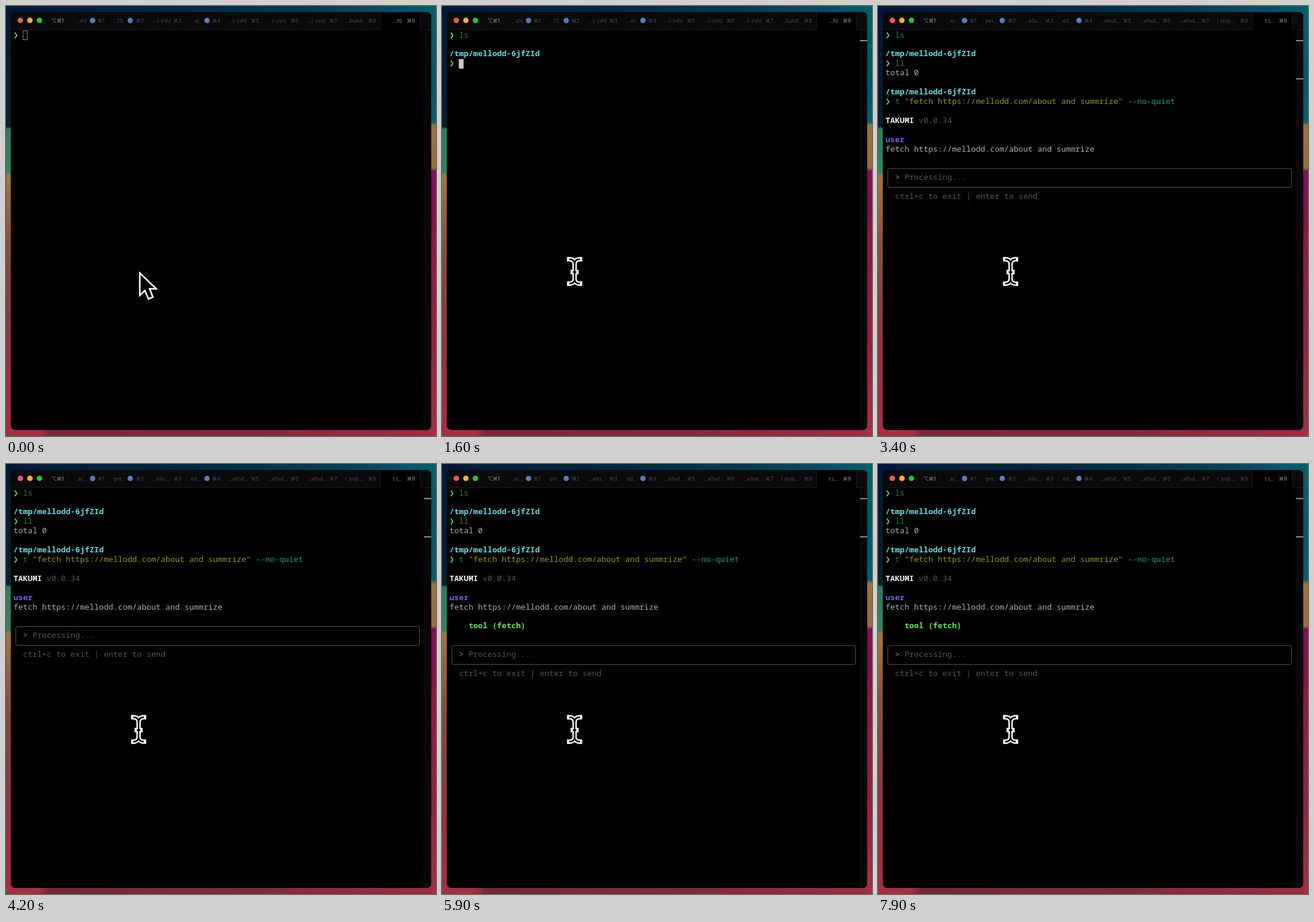
Animation of 720x720 px, one loop 8 s. Source, as an HTML page:

```html
<!DOCTYPE html>
<html lang="en">
<head>
<meta charset="utf-8">
<title>Terminal session</title>
<style>
  html, body { margin: 0; width: 100%; height: 100%; overflow: hidden; background: #000; }
  /* wallpaper showing around the window: left, right, top, bottom */
  body {
    background:
      linear-gradient(#021a3a, #06202c 202px, #2c7c5c 206px, #30845c 278px, #a47440 284px,
        #885038 400px, #84403c 500px, #98303c 600px, #a82e40) 0 0 / 8px 720px no-repeat,
      linear-gradient(#006068, #005868 130px, #006070 194px, #a07434 200px, #986c34 272px, #880c58 276px,
        #841048 345px, #901840 400px, #981e40 560px, #a83040) 712px 0 / 8px 720px no-repeat,
      linear-gradient(90deg, #021a3a, #04283e 300px, #06384c 500px, #0c4860 620px, #065468 670px, #006068)
        0 0 / 720px 20px no-repeat,
      linear-gradient(90deg, #a83040 56px, #782838 72px, #802a3a 400px, #a42c40) 0 700px / 720px 20px no-repeat;
  }
  svg { display: block; width: 720px; height: 720px; }
  text { white-space: pre; }
  #screen text { font: 13.25px "Noto Sans Mono", "DejaVu Sans Mono", monospace; }
  #tabs text { font: 8.5px Inter, "DejaVu Sans", sans-serif; fill: #4c4a4c; }
  #tabs .on { fill: #969498; }
  #screen .prompt { fill: #64ec50; font-weight: 700; }
  #screen .path { fill: #64dce0; font-weight: 600; }
  #screen .cmd { fill: #28862c; }
  #screen .str { fill: #98942c; }
  #screen .opt { fill: #229c80; }
  #screen .out { fill: #b0aeb0; }
  #screen .dim { fill: #585658; }
  #screen .mark { fill: #908e90; }
  #screen .title { fill: #f2f0f2; font-weight: 700; }
  #screen .user { fill: #7064e8; font-weight: 600; }
  #screen .tool { fill: #64e860; font-weight: 600; }
</style>
</head>
<body>
<svg viewBox="0 0 720 720">
  <rect x="8" y="10" width="704" height="700" rx="8"/>
  <path d="M8 40V18a8 8 0 0 1 8-8H704a8 8 0 0 1 8 8V40Z" fill="#0a0a0c"/>
  <path d="M699 40h13V702a8 8 0 0 1-8 8h-5Z" fill="#09090b"/>
  <path d="M628 11h65v29h-65Z"/>
  <path d="M8 39.5H628M693.5 12V39.5H712M627.5 12V39" fill="none" stroke="#1a1a1c"/>
  <circle cx="24" cy="24" r="4.6" fill="#f05a50"/>
  <circle cx="40" cy="24" r="4.6" fill="#f0b430"/>
  <circle cx="56" cy="24" r="4.6" fill="#2cc03c"/>
  <g id="tabs"></g>
  <g id="screen"></g>
  <path id="arrow" d="M224 447V484.5L232.5 476.5 238.5 490.5 246 487.5 240.5 473.5H251.5Z"
    stroke="#fff" stroke-width="2.6"/>
  <g id="beam" fill="none">
    <path id="edge" stroke="#fff" stroke-width="7.4" stroke-linecap="square"
      d="M213 424C219 424 222 427 222 432V457C222 462 219 465 213 465M231 424C225 424 222 427 222 432M222 457C222 462 225 465 231 465M219 445.5H225"/>
    <path id="core" stroke="#000" stroke-width="2.6"/>
  </g>
</svg>
<script>
const $ = id => document.getElementById(id);
const LOOP = 8000;
const COL = 7.95, ROW = 15.92;
const FOCUS = 500, RUN_LS = 1400, RUN_LL = 2050, RUN_T = 2650, TITLES = 2900, APP = 3300, TOOL = 5300;

const DIR = '/tmp/mellodd-6jfZId';
const ASK = 'fetch https://mellodd.com/about and summrize';

// label x, shortcut x, idle title, busy title, status dot x
const TABS = [
  [116, 153, '…sh)', '..e/…', 145],
  [180, 217, '…11)', 'pvt…', 208],
  [245, 280, '…(-zsh)', '…ello…'],
  [309, 345, '…e)', 'dd…', 336.5],
  [372, 410, '…(-zsh)', '…ellod…'],
  [438, 476, '…(-zsh)', '…ellod…'],
  [504, 541, '…(-zsh)', '…ellod…'],
  [568, 606, '…build)', 't (esb…'],
  [648, 671, '…h)', 't (…']
];

const label = (x, s, cls = '') => `<text x="${x}" y="27.5" class="${cls}">${s}</text>`;
const text = (row, col, s, cls) =>
  `<text x="${12.6 + col * COL}" y="${52.5 + row * ROW}" class="${cls}">${s}</text>`;
const cursor = (row, col) =>
  `<rect x="${12.2 + col * COL}" y="${41.2 + row * ROW}" width="8" height="15.8" fill="#cccacc"/>`;
const scrollMark = y => `<path d="M700 ${y}h12" stroke="#908e90" stroke-width="2"/>`;
const prompt = row => text(row, 0, '❯', 'prompt');

// The part of a command entered so far; keys are the press times.
const typed = (s, keys, t) => s.slice(0, keys.filter(k => t >= k).length);

function shellLine(row, s, t, end) {
  return prompt(row) + text(row, 2, s, 'cmd') + (t < end ? cursor(row, 2 + s.length) : '');
}

function request(t) {
  const row = 7, full = t >= 2500;
  let s = prompt(row);
  if (t >= 2300) s += text(row, 2, 't', 'cmd');
  if (full) s += text(row, 4, `"${ASK}"`, 'str') + text(row, 51, '--no-quiet', 'opt');
  if (t < RUN_T) s += cursor(row, full ? 61 : t >= 2300 ? 3 : 2);
  else if (t < APP) s += cursor(8, 0);
  return s;
}

function app(t) {
  const tool = t >= TOOL, row = tool ? 17 : 15, top = tool ? 304 : 272.2;
  return text(9, 0, 'TAKUMI', 'title') + text(9, 7, 'v0.0.34', 'dim')
    + text(11, 0, 'user', 'user') + text(12, 0, ASK, 'out')
    + (tool ? text(14, 4, 'tool (fetch)', 'tool') : '')
    + `<rect x="16.5" y="${top}" width="676" height="31.5" rx="2.5" fill="none" stroke="#545254"/>`
    + text(row, 2, '&gt;', 'mark') + text(row, 4, 'Processing...', 'dim')
    + text(row + 2, 2, 'ctrl+c to exit | enter to send', 'dim');
}

function screen(t) {
  if (t < FOCUS)
    return prompt(0) + '<rect x="28.5" y="41.5" width="7.2" height="15" fill="none" stroke="#8c8a8c"/>';
  let s = shellLine(0, typed('ls', [900, 1100], t), t, RUN_LS);
  if (t >= RUN_LS)
    s += scrollMark(58) + text(2, 0, DIR, 'path') + shellLine(3, typed('ll', [1800, 1900], t), t, RUN_LL);
  if (t >= RUN_LL)
    s += scrollMark(122) + text(4, 0, 'total 0', 'out') + text(6, 0, DIR, 'path') + request(t);
  if (t >= APP) s += app(t);
  return s;
}

function tabs(t) {
  return label(76, '⌥⌘1', 'on') + TABS.map(([x, keyX, idle, busy, dot], i) => {
    const cls = i === TABS.length - 1 ? 'on' : '';
    return label(x, t < TITLES ? idle : busy, cls) + label(keyX, '⌘' + (i + 1), cls)
      + (dot ? `<circle cx="${dot}" cy="24.3" r="4.5" fill="#587cc4"/>` : '');
  }).join('');
}

const shown = {};
function put(id, html) {
  if (shown[id] !== html) $(id).innerHTML = shown[id] = html;
}

$('core').setAttribute('d', $('edge').getAttribute('d'));
const start = performance.now();
function frame() {
  const t = (performance.now() - start) % LOOP;
  put('tabs', tabs(t));
  put('screen', screen(t));
  $('arrow').style.display = t < FOCUS ? '' : 'none';
  $('beam').style.display = t < FOCUS ? 'none' : '';
  requestAnimationFrame(frame);
}
frame();
</script>
</body>
</html>
```
